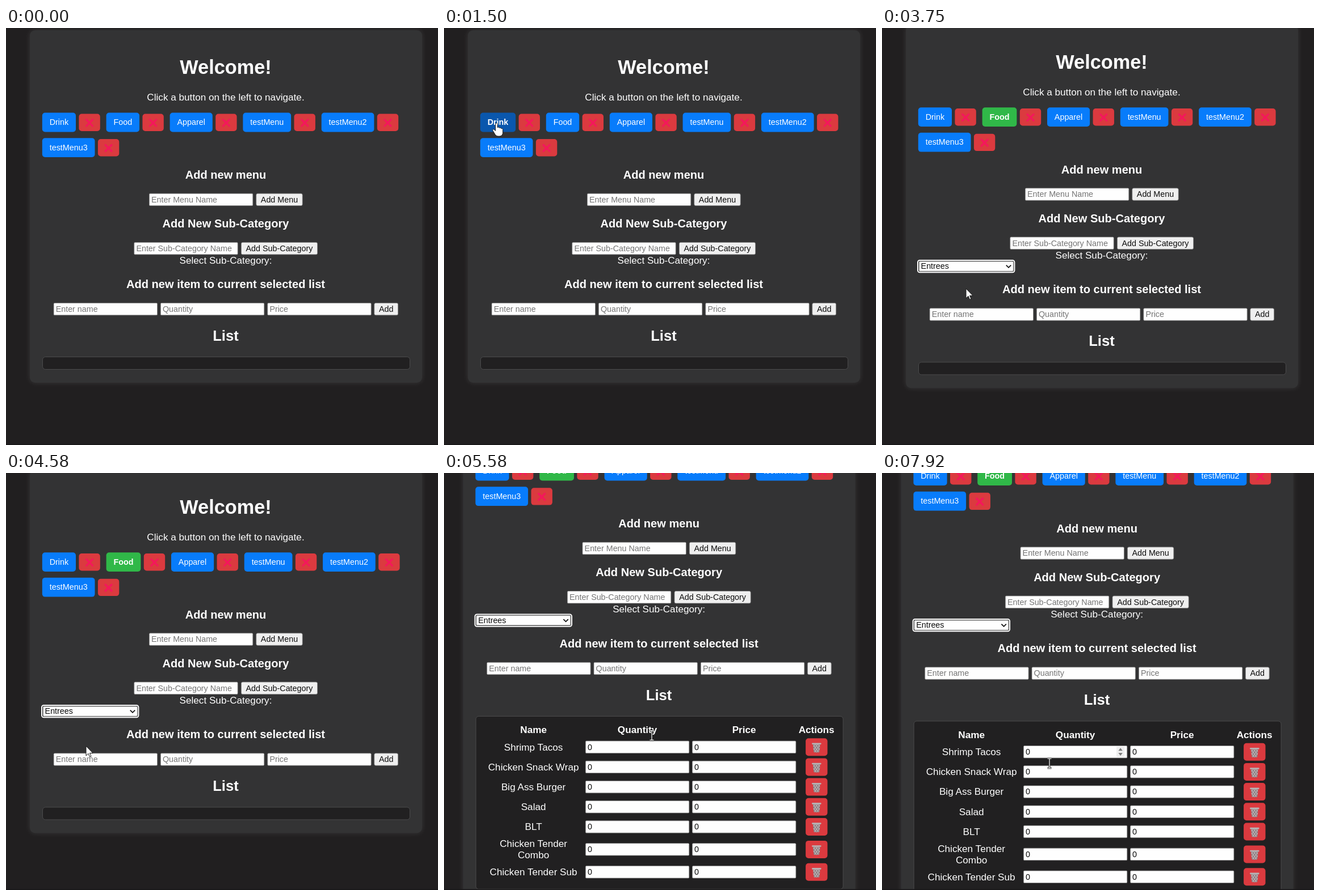
These frames come from a looping animation (761x736 px, 8 s). An HTML page:

```html
<!DOCTYPE html>
<html lang="en">
<head>
<meta charset="utf-8">
<title>Menu editor</title>
<style>
  html, body { margin: 0; width: 100%; height: 100%; overflow: hidden; background: #211f20; }
  svg { display: block; width: 761px; height: 736px; }
  text { font-family: "Liberation Sans", Arial, sans-serif; font-size: 17.15px; fill: #fff; white-space: pre; }
  .b { font-weight: bold; }
  .mid { text-anchor: middle; }
  .ui { font-size: 14.34px; }
  .dark { fill: #0c0c0c; }
  .hint { fill: #757575; }
  .card { fill: #333334; filter: drop-shadow(0 0 5px rgba(255, 255, 255, .1)); }
  .panel { fill: #212021; stroke: #4b4b4c; }
  .field { fill: #fefefe; stroke: #858585; stroke-width: .8; }
  .push { fill: #efefef; stroke: #858585; stroke-width: .8; }
  .del { fill: #db3a3f; }
  .x { stroke: #f4175c; stroke-width: 3.2; stroke-linecap: round; }
</style>
</head>
<body>
<script>
const NS = 'http://www.w3.org/2000/svg';
const LOOP = 8000, TICK = 250 / 3;

function el(parent, tag, attrs) {
  const e = document.createElementNS(NS, tag);
  for (const k in attrs) e.setAttribute(k, attrs[k]);
  return parent.appendChild(e);
}
const group = parent => el(parent, 'g', {});
const rect = (p, x, y, width, height, rx, cls) =>
  el(p, 'rect', { x, y, width, height, rx, class: cls });
const path = (p, d, attrs) => el(p, 'path', { d, fill: 'none', ...attrs });
function text(p, str, x, y, cls, size) {
  const e = el(p, 'text', { x, y, class: cls });
  if (size) e.style.fontSize = size + 'px';
  e.textContent = str;
  return e;
}
const title = (p, str, y, size) => text(p, str, 387, y, 'b mid', size);
function field(p, x, y, str, cls = 'hint') {
  rect(p, x + .4, y + .4, 182.4, 21.4, 1.5, 'field');
  text(p, str, x + 4, y + 16, 'ui ' + cls, 14.3);
}
function push(p, x, y, w, str) {
  rect(p, x + .4, y + .4, w - .8, 21.4, 2.5, 'push');
  text(p, str, x + w / 2, y + 16, 'ui dark mid');
}
const move = (e, x, y) => e.setAttribute('transform', `translate(${x} ${y})`);
const show = (e, on) => { e.style.display = on ? '' : 'none'; };

const svg = el(document.body, 'svg', { viewBox: '0 0 761 736' });
const page = group(svg);
const card = rect(page, 42, 4, 691, 622, 9, 'card');
const upper = group(page), lower = group(page);

// Upper part: title, menus and category controls
title(upper, 'Welcome!', 81, 34.3);
text(upper, 'Click a button on the left to navigate.', 387, 128, 'mid');

const pen = document.createElement('canvas').getContext('2d');
function measure(str, bold) {
  pen.font = `${bold ? 'bold ' : ''}100px "Liberation Sans", Arial, sans-serif`;
  return pen.measureText(str).width * .1434;
}
const menus = ['Drink', 'Food', 'Apparel', 'testMenu', 'testMenu2', 'testMenu3'].map((name, i) => {
  const g = group(upper), y = i < 5 ? 149.6 : 194.2;
  const box = rect(g, 0, y, 10, 33.8, 5, '');
  const label = text(g, name, 0, y + 21.5, 'ui mid');
  const del = group(g);
  rect(del, 0, y + 1.9, 37.4, 30.4, 5, 'del');
  path(del, `M13.2 ${y + 12.2}l11 11m0-11l-11 11`, { class: 'x' });
  return { name, g, box, label, del };
});
function layMenus(hover, active) {
  let x = 63.8;
  menus.forEach((m, i) => {
    if (i === 5) x = 63.8;
    const bold = i === hover, w = measure(m.name, bold) + 25.74;
    move(m.g, x, 0);
    m.box.setAttribute('width', w);
    m.box.setAttribute('fill', i === active ? '#30b848' : bold ? '#0a57ad' : '#087cfb');
    m.label.setAttribute('x', w / 2);
    m.label.style.fontWeight = bold ? 'bold' : 'normal';
    move(m.del, w + 5.4, 0);
    x += w + 53.6;
  });
}

title(upper, 'Add new menu', 266, 20.07);
field(upper, 252, 291.8, 'Enter Menu Name');
push(upper, 440.4, 291.8, 82.2, 'Add Menu');
title(upper, 'Add New Sub-Category', 352.3, 20.07);
field(upper, 225.4, 378, 'Enter Sub-Category Name');
push(upper, 414, 378, 135, 'Add Sub-Category');
text(upper, 'Select Sub-Category:', 387, 416.3, 'mid');

const picker = group(upper);
const ring = rect(picker, 63, 419.3, 170.4, 21.4, 3.5, '');
ring.style.cssText = 'fill:#101010;stroke:#fff;stroke-width:2';
rect(picker, 65.2, 421.3, 166.2, 17.4, 1.5, 'field');
const choice = text(picker, '', 68.6, 434.9, 'ui dark', 14.3);
path(picker, 'M218.8 428l4.2 4.2 4.2-4.2', { stroke: '#111', 'stroke-width': 1.8 });

// Lower part: item form and list
title(lower, 'Add new item to current selected list', 458.8, 20.07);
field(lower, 83.7, 485, 'Enter name');
field(lower, 272, 485, 'Quantity');
field(lower, 460.4, 485, 'Price');
push(lower, 648.4, 485, 42.6, 'Add');
title(lower, 'List', 552, 25.7);
const panel = rect(lower, 64.5, 580.5, 647, 22, 5, 'panel');

const table = group(lower);
[['Name', 166], ['Quantity', 349], ['Price', 537], ['Actions', 664.5]]
  .forEach(([s, x]) => text(table, s, x, 610.2, 'b mid'));

function bin(p, x, y) {
  const g = group(p);
  move(g, x, y);
  path(g, 'M-6.4-5.5H6.4L5 8.5Q0 10-5 8.5Z', { fill: '#8f7f83' });
  path(g, 'M-5.6-4L3.6 8.6M-1.6-5L5 4M2.6-5L5.6-1M-5.6 2L-.6 8.6M5.6-4L-3.6 8.6M1.6-5L-5 4M-2.6-5L-5.6-1M5.6 2L.6 8.6',
    { stroke: '#c9c3c5', 'stroke-width': .9 });
  path(g, 'M-7-6.4H7', { stroke: '#b9b4b6', 'stroke-width': 2.6, 'stroke-linecap': 'round' });
}
const items = ['Shrimp Tacos', 'Chicken Snack Wrap', 'Big Ass Burger', 'Salad', 'BLT',
  'Chicken Tender|Combo', 'Chicken Tender Sub'];
items.forEach((item, i) => {
  const y = 634.7 + 35.2 * i + Math.max(0, i - 4) * 4.7;
  const lines = item.split('|');
  lines.forEach((s, n) => text(table, s, 166, y + 6 + (n - (lines.length - 1) / 2) * 20, 'mid'));
  field(table, 257.4, y - 11, '0', 'dark');
  field(table, 445.5, y - 11, '0', 'dark');
  rect(table, 645.5, y - 15.4, 38.4, 31, 5, 'del');
  bin(table, 664.7, y + .6);
});
const spin = group(table);
rect(spin, 421.5, 625.6, 14, 18.4, 0, '').style.fill = '#efefef';
path(spin, 'M424.8 632.8l3.7-5 3.7 5zM424.8 636.6l3.7 5 3.7-5z', { fill: '#7b7b7b' });

rect(svg, 0, 734.4, 761, 2, 0, '').style.fill = '#191819';

// Pointers, drawn around their hot spot
const outline = { fill: '#fff', stroke: '#1a1a1a', 'stroke-width': 1, 'stroke-linejoin': 'round' };
const pointers = { arrow: group(svg), hand: group(svg), beam: group(svg) };
path(pointers.arrow, 'M0 0V17L4 13.2 6.6 19.3 9 18.2 6.5 12.4H12Z', outline);
path(pointers.hand, 'M-1.9 1.6C-1.9-.8 1.7-.8 1.7 1.6V7.6C2.6 6.6 5 7 5.2 8.4 6.4 7.6 8.2 8.2 8.4 9.6 ' +
  '9.6 8.8 11.2 9.6 11.2 11.4V16C11.2 20 9 23 5 23H3C0 23-1.5 21.5-3 19L-6.6 13C-7.4 11.4-5.4 9.8-3.8 11.4L-1.9 13.4Z', outline);
const stem = 'M-3.5-8.3H3.5M0-8.3V8.3M-3.5 8.3H3.5';
path(pointers.beam, stem, { stroke: '#1a1a1a', 'stroke-width': 3 });
path(pointers.beam, stem, { stroke: '#f2f2f2', 'stroke-width': 1.3 });

// Timelines: [ms, value...]
const track = [[80, 330, 262], [500, 236, 218], [670, 236, 218], [1420, 93, 165], [1500, 92.5, 168],
  [2170, 92.5, 168], [2500, 165, 166], [2670, 165, 166], [2750, 207.5, 162], [3000, 207.5, 162],
  [3500, 150, 421], [3670, 150, 421], [3750, 148, 460], [3920, 148, 460], [4580, 141, 482],
  [4750, 141, 482], [5330, 366, 461.5], [5580, 366, 461.5], [5670, 366, 478.5], [7340, 366, 478.5],
  [7500, 295, 512.5]];
const scroll = [[0, 0], [5400, 0], [5580, 19.5], [6420, 19.5], [6500, 0], [7840, 0], [7920, 11]];
const shape = [[0, ''], [80, 'arrow'], [1330, 'hand'], [3080, 'arrow'], [5250, 'beam']];
const hovered = [[0, -1], [1330, 0], [2750, 1]];
const chosen = [[0, -1], [1830, 0], [3000, 1]];

const at = (steps, t) => steps.reduce((v, s) => s[0] <= t ? s[1] : v, steps[0][1]);
function along(keys, t) {
  const n = keys.findIndex(k => k[0] > t);
  if (n < 1) return (n ? keys[keys.length - 1] : keys[0]).slice(1);
  const a = keys[n - 1], b = keys[n], f = (t - a[0]) / (b[0] - a[0]);
  return a.slice(1).map((v, i) => v + (b[i + 1] - v) * f);
}

let last = -1;
function render(now) {
  const tick = Math.floor((now % LOOP + 4) / TICK);
  if (tick === last) return;
  last = tick;
  const t = tick * TICK + 5;
  const loaded = t >= 1830, listed = t >= 4670;
  const gap = loaded ? 9.4 : 0, height = listed ? 305 : 22;

  layMenus(at(hovered, t), at(chosen, t));
  move(page, listed ? -8.4 : 0, listed ? -141 - along(scroll, t)[0] : 0);
  move(upper, 0, -gap);
  move(lower, 0, gap);
  card.setAttribute('y', 4 - gap);
  card.setAttribute('height', 600 + height + 2 * gap);
  panel.setAttribute('height', height);
  show(picker, loaded);
  show(ring, t >= 3500);
  choice.textContent = t < 3750 ? 'Select a Sub-Category' : 'Entrees';
  show(table, listed);
  show(spin, t >= 5670);

  const kind = at(shape, t), [x, y] = along(track, t);
  for (const k in pointers) {
    show(pointers[k], k === kind);
    move(pointers[k], x, y);
  }
}
function frame() {
  render(performance.now());
  requestAnimationFrame(frame);
}
frame();
</script>
</body>
</html>
```
